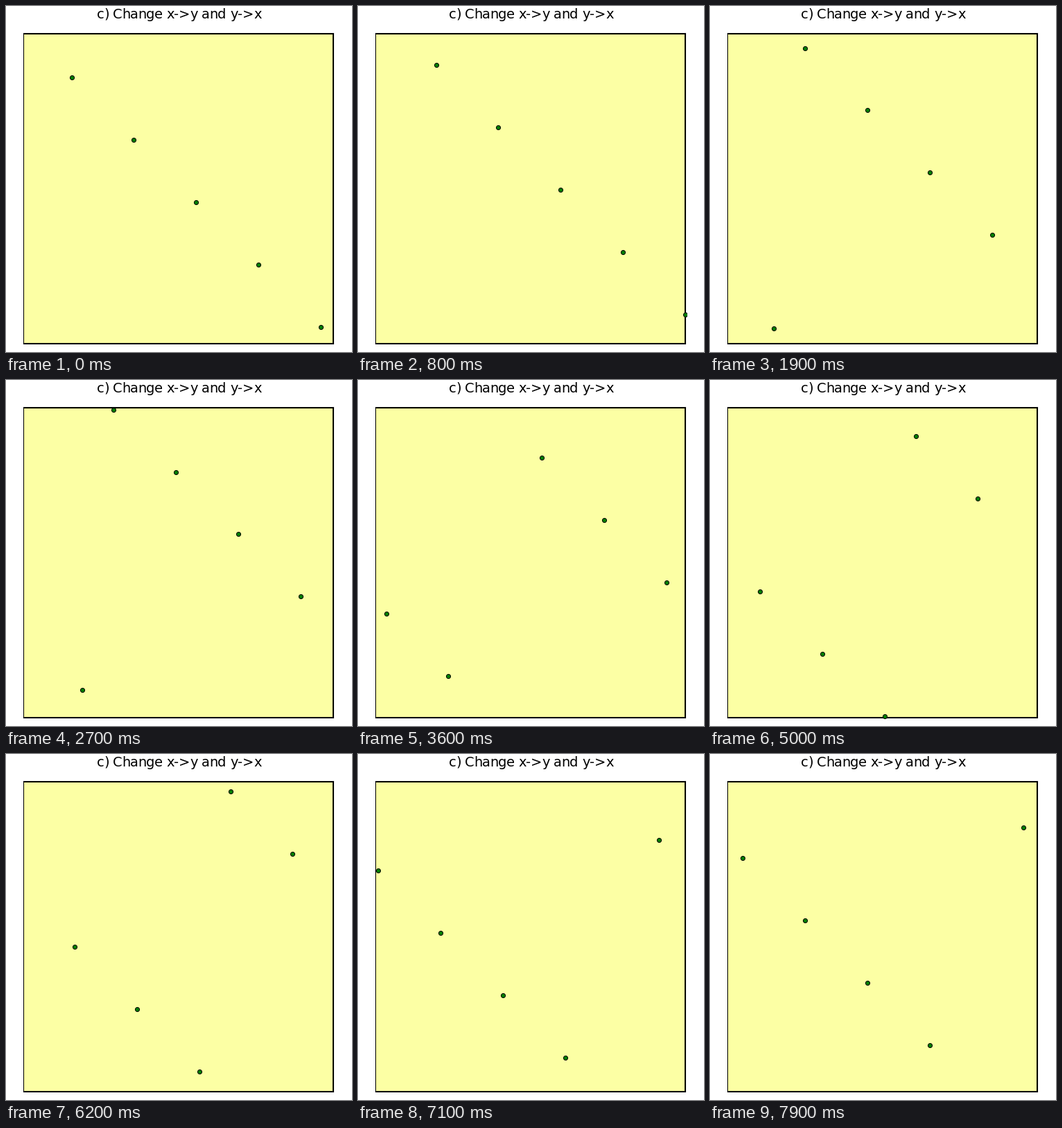
These frames come from a looping animation (499x499 px, 8 s). A matplotlib script:

```python
import math

import matplotlib.pyplot as plt
import numpy as np
from matplotlib.animation import FuncAnimation
from matplotlib.patches import Rectangle
from matplotlib.textpath import text_to_path

SIZE, DPI = 499, 100
GRID = 200          # cells per side; a dot leaving the grid swaps x and y
FRAMES, INTERVAL = 80, 100

plt.rcParams["font.family"] = "DejaVu Sans"

k = np.arange(5)
START = np.column_stack([31 + 40 * k, 171 - 40 * k])


def positions(step):
    pos = START + step
    out = (pos >= GRID).any(axis=1)
    pos[out] = pos[out, ::-1] % GRID
    return pos


def draw_title(fig, text, baseline, size):
    """Centre text, with each glyph's advance cut to whole pixels."""
    glyphs = [fig.text(0, 1 - baseline / SIZE, ch, size=size) for ch in text]
    prop = glyphs[0].get_fontproperties()

    def width(s):
        return text_to_path.get_text_width_height_descent(s, prop, False)[0]

    advances = [math.floor((width(f"|{ch}|") - width("||")) * DPI / 72)
                for ch in text]
    x = round((SIZE - sum(advances)) / 2)
    for glyph, advance in zip(glyphs, advances):
        glyph.set_x(x / SIZE)
        x += advance


fig = plt.figure(figsize=(SIZE / DPI, SIZE / DPI), dpi=DPI, facecolor="white")
ax = fig.add_axes([0.05, 0.02295, 0.9, 0.9])
ax.set(xlim=(0, GRID), ylim=(-0.1, GRID - 0.1))
ax.axis("off")
ax.add_patch(Rectangle((0, 0), GRID - 1, GRID - 1, facecolor="#fcffa4",
                       edgecolor="black", linewidth=1.5))
draw_title(fig, "c) Change x->y and y->x", baseline=18, size=14)
dots, = ax.plot([], [], "o", color="green", markersize=4.4, snap=False,
                markeredgecolor="black", markeredgewidth=0.7, zorder=3)


def update(step):
    dots.set_data(*positions(step).T)
    return dots,


anim = FuncAnimation(fig, update, frames=FRAMES, interval=INTERVAL,
                     repeat=True, repeat_delay=0)
plt.show()
```
